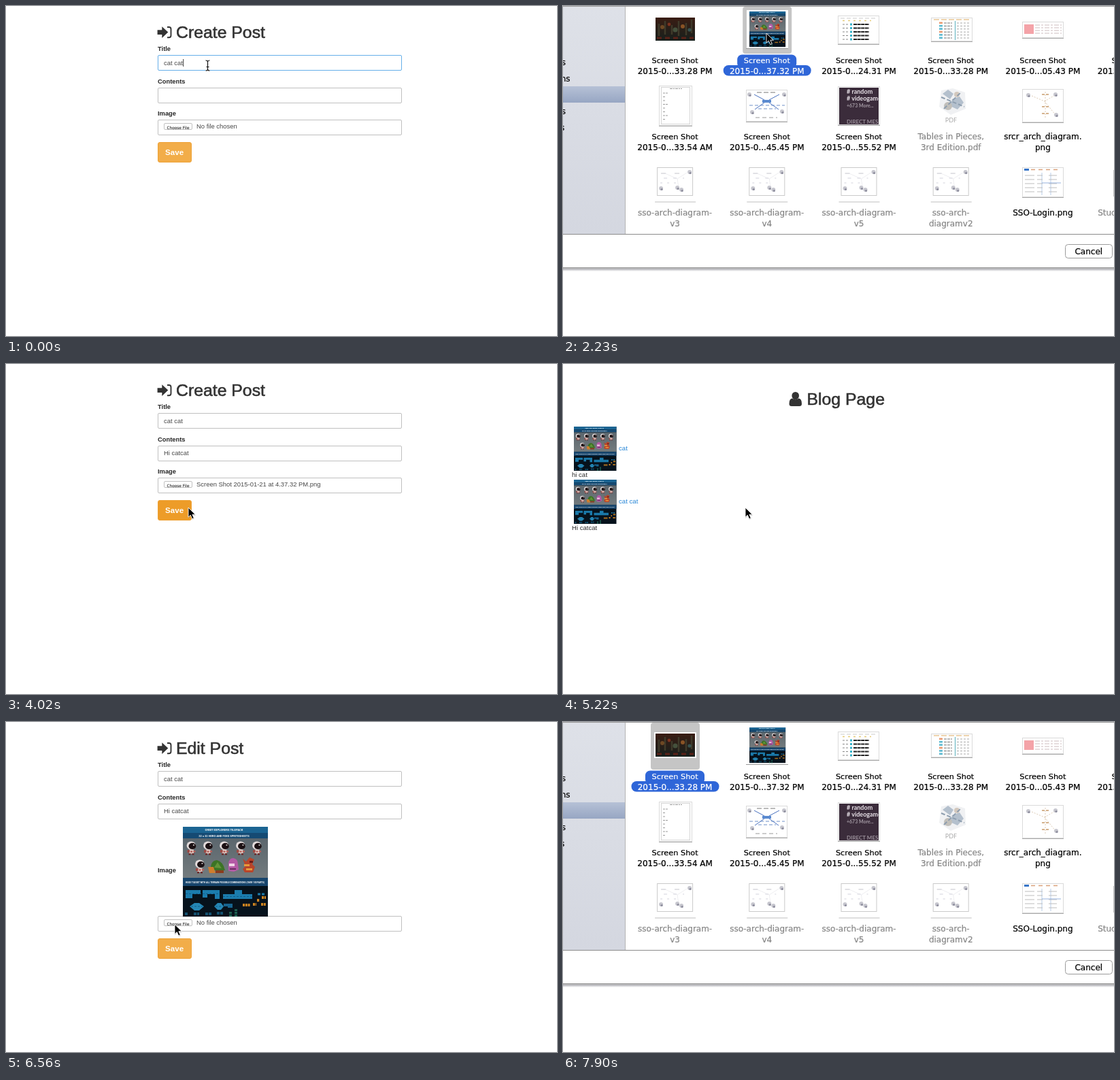
Recreate the animation shown at these times as an HTML page. Size 810x485 px, loop 8 s.

```html
<!DOCTYPE html>
<html lang="en">
<head>
<meta charset="utf-8">
<title>Create and edit a post</title>
<style>
html, body { margin: 0; width: 100%; height: 100%; overflow: hidden; background: #fff; }
svg { display: block; width: 810px; height: 485px; }
text { white-space: pre; }
.page { font-family: "Liberation Sans", Arial, sans-serif; font-size: 9.45px; fill: #484848; }
.page .label { font-weight: bold; font-size: 9.35px; fill: #262626; }
.page .head { font-size: 24.8px; fill: #333; stroke: #333; stroke-width: .6px; }
.page .save { font-weight: bold; font-size: 11.6px; fill: #fff; }
.page .dark { fill: #2b2b2b; font-size: 9.55px; }
.page .link { fill: #2585d6; font-size: 9.65px; }
.sys { font-family: "DejaVu Sans", sans-serif; font-size: 12px; fill: #000; }
.name, .place { stroke: currentColor; stroke-width: .22px; fill: currentColor; }
.tiny { font-family: "DejaVu Sans", sans-serif; font-size: 5.8px; fill: #000; }
.pack { font-family: Roboto, sans-serif; font-weight: bold; fill: #fff; text-anchor: middle; }
.chat { font-family: Lato, sans-serif; font-weight: bold; font-size: 9px; fill: #e8e2e8; }
</style>
</head>
<body>
<svg id="stage" viewBox="0 0 810 485" xmlns="http://www.w3.org/2000/svg"></svg>
<script>
const stage = document.getElementById('stage');
const range = n => [...Array(n).keys()];
const rect = (x, y, w, h, fill, extra = '') =>
  `<rect x="${x}" y="${y}" width="${w}" height="${h}" fill="${fill}" ${extra}/>`;
const text = (x, y, s, cls = '', extra = '') => `<text x="${x}" y="${y}" class="${cls}" ${extra}>${s}</text>`;
const shape = (d, fill) => `<path d="${d}" fill="${fill}"/>`;
const line = (d, color, width = 1, extra = '') =>
  `<path d="${d}" fill="none" stroke="${color}" stroke-width="${width}" ${extra}/>`;
const group = (id, body, extra = '') => `<g id="${id}" ${extra}>${body}</g>`;
const use = (id, x, y, sx = 1, sy = sx) => `<use href="#${id}" transform="translate(${x} ${y}) scale(${sx} ${sy})"/>`;
const gradient = (id, a, b) =>
  `<linearGradient id="${id}" x2="0" y2="1"><stop stop-color="${a}"/><stop offset="1" stop-color="${b}"/></linearGradient>`;
const mid = 'text-anchor="middle"';

// Sprite sheet picture, 125 x 132
const hero = `<ellipse cx="-.3" cy="-.3" rx="6.6" ry="6.2" fill="#e4dcdc"/><ellipse cx="1.4" cy=".4" rx="5.4" ry="4.6" fill="#1b1013"/>
  <ellipse cx="3.4" cy="-1.2" rx="1.1" ry=".9" fill="#e9e4e4"/>` +
  rect(-3.5, 5.5, 7, 6, '#dcc6c0') + rect(-6, 6, 3.5, 4, '#9c4a44') + rect(3, 7, 3, 2.5, '#b9605a') +
  rect(-1.5, 7.5, 3, 2, '#b0524b') + rect(-4, 11, 3, 2.4, '#6d2a2a') + rect(1, 11, 3, 2.4, '#6d2a2a');
const pack =
  rect(0, 0, 125, 132, '#06121c') + rect(0, 0, 125, 9, '#1b6492') + rect(0, 9, 125, 8, '#154a73') +
  rect(0, 17, 125, 58, 'url(#steel)') + rect(0, 75, 125, 12, '#17456c') +
  `<g class="pack">` +
  text(60.5, 6.3, 'ORBIT EXPLORERS TILEPACK', '', 'font-size="4.2"') +
  text(60.5, 14.5, '32 x 32 HERO AND FOES SPRITESHEETS', '', 'font-size="4.05"') +
  text(62, 82.6, 'HUGE TILESET WITH ALL TERRAIN POSSIBLE COMBINATIONS (OVER 100 PARTS)', '', 'font-size="3.15"') + '</g>' +
  [12.5, 37, 61, 85, 109].map(x => use('hero', x, 28)).join('') + use('hero', 25, 55) +
  shape('M41 64Q40 50 50 49Q59 51 62 64Z', '#3c7425') + shape('M46 60L51 52L57 61Z', '#63953a') +
  shape('M37 59h8l3 9H39z', '#cf7d2d') + shape('M48 64h12v4H48z', '#8a3c1e') +
  shape('M67 65V54Q68 46 74 46Q81 47 81 55L82 63L75 66Z', '#b45aa6') + shape('M68 54h8v4h-8z', '#f0d3e6') + shape('M69 61h9v2h-9z', '#6b2c63') +
  shape('M88 47l5 4 5-6 7 3-3 7 4 4-3 8H91l-3-5 4-4z', '#b8452a') + shape('M90 55h8v3h-8zM93 61h9v3h-9z', '#e79a3b') + shape('M98 50h5v3h-5z', '#6b1c18') +
  shape('M4 93H26V99H14V105H4ZM29 93H54V106H47V99H36V104H29ZM59 99H76V93H87V99H102V106H59Z', '#1b7cad') +
  shape('M10 117l7-5h7l7 5-7 6h-7zM46 117l5-5h5l4 5-4 5h-5z', '#2587b5') +
  line('M4 98.5H54M59 102.5H102M12 117H29M48 117H58', '#0f5c88', 1, 'stroke-dasharray="3 2"') +
  shape('M60 113H73V119H66V117H60Z', '#17648f') +
  line('M3 128H8M16 128H24M33 128H42M50 127H59', '#12506f', 4, 'stroke-dasharray="4 1"') +
  line('M78 121V132M70 125V132', '#1d5f50', 4, 'stroke-dasharray="3 1"') +
  line('M88 115H99M103 114H108M115 114H122M109 108H113M116 104H122', '#cf8420', 4, 'stroke-dasharray="3 .8"') +
  line('M110 99H122', '#1d7aa8', 3, 'stroke-dasharray="4 2"');

// Form and blog pages
const field = (id, y) => rect(223.5, y + .5, 358, 22, '#fff', `id="${id}" rx="1.5" stroke="#c0c0c0"`);
const signIn = shape('M222.6 35.3H229.3V30.2L238.3 38.6L229.3 47V42H222.6Z', '#333') +
  line('M237 31H239.6Q242.5 31 242.5 34V43.3Q242.5 46.3 239.6 46.3H237', '#333', 1.9);
const form = signIn + text(250, 47, '', 'head', 'id="heading"') +
  text(223, 66, 'Title', 'label') + field('titleBox', 72) + text(232, 87, 'cat cat') +
  text(223, 114, 'Contents', 'label') + field('bodyBox', 120) + text(232, 134, '', '', 'id="bodyText"') +
  text(223, 161, 'Image', 'label', 'id="imageLabel"') +
  group('lower', field('fileBox', 167) +
    rect(232.5, 172.5, 41, 9, '#fdfdfd', 'id="choose" rx="1.5" stroke="#c2c2c2"') +
    text(236.5, 180.7, 'Choose File', 'tiny') + text(280, 180, '', '', 'id="fileName"') +
    rect(223.5, 200.5, 49, 29, '#f0ad4e', 'id="save" rx="2.5" stroke="#eea236"') + text(234, 219, 'Save', 'save')) +
  group('preview', use('pack', 260, 154)) +
  rect(0, 0, .9, 11, '#222', 'id="caret"');
const blog =
  shape('M332.5 58.5Q332.5 51 337 50.5Q341.7 54 346.5 50.5Q351 51 351 58.5Q351 62 347.5 62H336Q332.5 62 332.5 58.5Z', '#333') +
  `<ellipse cx="341.7" cy="46.6" rx="5.3" ry="5.7" fill="#333"/>` +
  text(358.5, 60, 'Blog Page', 'head') +
  use('pack', 16, 92, .5, .492) + text(82, 127, 'cat', 'link') + text(13, 165.5, 'hi cat', 'dark') +
  use('pack', 16, 170, .5, .492) + text(82, 205, 'cat cat', 'link') + text(13, 243.5, 'Hi catcat', 'dark');

// File chooser
const colX = i => 164.6 + 135.2 * i;
const shot = tail => ['Screen Shot', '2015-0...' + tail];
const rows = [
  [shot('33.28 PM'), shot('37.32 PM'), shot('24.31 PM'), shot('33.28 PM'), shot('05.43 PM'), shot('11.09 PM')],
  [shot('33.54 AM'), shot('45.45 PM'), shot('55.52 PM'), ['Tables in Pieces,', '3rd Edition.pdf'], ['srcr_arch_diagram.', 'png']],
  [['sso-arch-diagram-', 'v3'], ['sso-arch-diagram-', 'v4'], ['sso-arch-diagram-', 'v5'], ['sso-arch-', 'diagramv2'], ['SSO-Login.png'], ['Studies-of-final-v2']]
];
const faded = (r, c) => r === 1 && c === 3 || r === 2 && c !== 4;
const label = (lines, r, c) => `<g id="name${r}${c}" class="name" ${mid} color="${faded(r, c) ? '#868686' : '#000'}">` +
  lines.map((s, k) => text(colX(c), 84 + 112 * r + 16 * k, s, '', s === 'Screen Shot' ? 'font-size="11.3"' : '')).join('') + '</g>';
const paper = (x, y, w, h) => rect(x + .5, y + .5, w - 1, h - 1, '#fff', 'stroke="#dadada"') +
  line(`M${x} ${y + h + .5}H${x + w}`, '#a9a9a9');
const dashes = (x, y, w, color, dash = '4 1 2 1', width = 1) =>
  line(`M${x} ${y}h${w}`, color, width, `stroke-dasharray="${dash}"`);
const faces = pts => pts.map(([x, y]) =>
  `<circle cx="${x}" cy="${y}" r="3" fill="#c6c6ce"/><circle cx="${x + 1}" cy="${y + 1.5}" r="1.6" fill="#8e8e9e"/>`).join('');
const glow = (x, y, r, color) => `<circle cx="${x}" cy="${y}" r="${r}" fill="${color}" opacity=".7"/>`;
const sketch = c => {
  const x = colX(c) - 26.5;
  return rect(x + .5, 237.5, 52, 41, '#fff', 'stroke="#cacaca"') + line(`M${x - 3} 288H${x + 57}`, '#d4d4d4', 1.6) +
    dashes(x + 6, 246, 36, '#c3c3cb', '7 13') + dashes(x + 10, 253, 30, '#d2d2dc', '5 9') + dashes(x + 5, 260, 24, '#d2d2dc', '3 7') +
    line(`M${x + 12} 246l18 8l14 -9M${x + 30} 254l2 15`, '#e2e2e8', .6) + faces([[x + 48, 244], [x + 6, 268], [x + 30, 267], [x + 36, 270]]);
};
const gameShot = rect(134, 15, 62, 38, '#fff') + rect(136, 17, 58, 34, 'url(#dusk)') +
  line('M141 44V26M150 42V22M160 42V28M170 44V22M181 43V25M189 40V20', '#3f3a2a', 2.5) +
  glow(146, 31, 3, '#8a5a2a') + glow(156, 27, 2.4, '#9c3a22') + glow(165, 35, 3.5, '#51664c') + glow(176, 30, 3, '#b06a2c') + glow(186, 35, 2.6, '#3f6a68') +
  dashes(138, 47, 54, '#5a2117', '7 5', 3);
const lists =
  paper(404, 14, 61, 42) + dashes(408, 18, 54, '#c9c9c9', '6 3') + dashes(411, 21.5, 42, '#e5cb78', '3 5', 1.4) +
  range(5).map(i => dashes(411, 27 + 5.5 * i, 8, '#888', '3 2') + rect(422, 25.5 + 5.5 * i, 3, 3, '#35b4cc') + dashes(427, 27 + 5.5 * i, 23, '#222', '5 .6', 1.8)).join('') +
  paper(541, 17, 61, 35) + dashes(545, 20, 52, '#e7c592', '8 3', 1.5) +
  range(6).map(i => rect(553, 23.5 + 4.4 * i, 5, 2.6, i % 3 ? '#5cb9d0' : '#e99a70') + dashes(560, 25 + 4.4 * i, 12, '#777', '4 1') + dashes(579, 25 + 4.4 * i, 18, '#aaa', '3 2')).join('') +
  line('M576.5 22V50', '#58aebb', 1) +
  paper(675, 23, 61, 24) + rect(678, 27, 14, 14, '#f4a3a8') + range(4).map(i => dashes(694, 28 + 4 * i, 39, '#cdbcbe', '7 2 3 2')).join('');
const diagrams =
  paper(141, 117, 49, 59) + rect(144.5, 119.5, 42, 54, '#fff', 'stroke="#d4d4d4"') + dashes(157, 121.5, 18, '#999') +
  range(8).map(i => dashes(147, 128 + 5.5 * i, i % 3 ? 4 : 8, '#999', '3 1')).join('') +
  paper(269, 123, 61, 47) + line('M296 138L281 130M303 138L318 130M296 142L282 152M303 142L317 152', '#4a72c0', 1) + rect(293, 138, 13, 4, '#5a8ad0') +
  dashes(285, 127, 30, '#777', '7 3') + dashes(274, 146, 52, '#6f90c8', '5 3') + dashes(287, 151, 26, '#6f90c8', '5 3') + dashes(283, 164, 32, '#999', '6 4') +
  faces([[274, 130], [325, 130], [278, 156], [322, 155]]) +
  paper(675, 122, 61, 49) + line('M709 126V166M689 132L708 140L725 130M708 140L724 160', '#cdb494', .7, 'stroke-dasharray="2 2"') +
  faces([[684, 131], [724, 130], [725, 160]]) + [130, 148, 158].map(y => dashes(704, y, 11, '#c79a6a', '4 2', 1.6)).join('') +
  range(4).map(sketch).join('') + rect(809, 241, 1, 39, '#c4c4c4') +
  paper(675, 237, 61, 44) + rect(678, 239, 7, 3, '#3976c8') + dashes(688, 240.5, 42, '#d9a07a', '6 5', 1.5) +
  line('M704 245V278M717 245V278', '#a5bfe2', .8) + range(5).map(i => dashes(679, 249 + 6 * i, 47, '#bdbdbd', '14 4 8 9')).join('') + line('M704 260H732', '#7ba0d6', .8);
const chat = paper(404, 118, 62, 57) + rect(406, 120, 58, 54, '#3b2c3b') +
  `<svg x="406" y="120" width="58" height="54" viewBox="406 120 58 54" class="chat">` +
  text(417, 129, '# random') + text(417, 139, '# videogames') + text(417, 149, '+673 More...', '', 'font-size="7" opacity=".6"') +
  text(417, 173, 'DIRECT MESSAGE', '', 'font-size="8" opacity=".55"') + '</svg>';
const book = shape('M556 124l17 -3 18 6 1 24 -22 9 -17 -12z', '#f0f1f3') +
  shape('M558 129l8 -6 8 6 -5 8zM572 137l11 -4 6 9 -9 10 -11 -5z', '#b4c0cd') +
  `<circle cx="566" cy="147" r="6" fill="#c1bfba"/><circle cx="579" cy="130" r="4" fill="#d3c8bd"/>` +
  line('M556 134L590 148M560 151L586 126', '#8e9eaf', 2, 'stroke-dasharray="6 3"') +
  text(570.5, 171, 'PDF', '', `${mid} font-size="9" style="fill:#aaa"`);
const thumbs = gameShot + rect(270, 6, 61, 56, '#fff') + use('pack', 274, 8, .425, .395) + line('M269 62.5H331', '#999') +
  lists + diagrams + chat + book;
const selection = group('selection', rect(129, 1, 72, 69, '#c5c5c5', 'rx="4"') +
  rect(121, 71.5, 87, 20, '#2f66d8', 'rx="7"') + rect(100.5, 87, 129, 15.5, '#2f66d8', 'rx="7.5"'));
const sheet =
  rect(0, -10, 810, 395, '#fff') + rect(0, 386, 810, 4, 'url(#shade)') +
  group('sidebar', rect(0, 0, 91, 335, 'url(#side)') + rect(0, 118, 91, 24, 'url(#row)')) +
  [['Downloads', 4, 86.5], ['Applications', 10.5, 110.5], ['Documents', 4, 158.5], ['Pictures', 2.3, 182.5]]
    .map(([s, x, y]) => text(x, y, s, 'place', 'text-anchor="end"')).join('') +
  line('M91.5 -6V335', '#b4b4b4') + line('M0 .5H810', '#9a9a9a') + line('M0 335.5H810', '#8b8b8b') + line('M0 384.8H810', '#777', 1.2) +
  rect(738.5, 350.5, 69, 20, '#fff', 'rx="4" stroke="#9b9b9b"') + text(772.8, 364.8, 'Cancel', 'place', mid) +
  group('files', selection + thumbs + rows.map((row, r) => row.map((n, c) => label(n, r, c)).join('')).join(''));

const beam = 'M-3 -7.5Q0 -7.5 0 -5.5Q0 -7.5 3 -7.5M0 -6V6M-3 7.5Q0 7.5 0 5.5Q0 7.5 3 7.5M-2 2H2';
stage.innerHTML = '<defs>' +
  gradient('steel', '#5b666d', '#737b7e') + gradient('dusk', '#3a1d13', '#17201d') + gradient('side', '#dee1e8', '#d4d7e0') +
  gradient('row', '#b6c1d6', '#97a6c3') + gradient('shade', '#aaaab0', '#fff') + gradient('press', '#8bb9ee', '#4c92e2') +
  group('hero', hero) + group('pack', pack) + '</defs>' +
  group('form', form, 'class="page"') + group('blog', blog, 'class="page"') + group('sheet', sheet, 'class="sys"') +
  group('ghost', rect(224, 331, 48, 16, '#ede5da', 'rx="2"') + shape('M234 331h28v5l-4 2h-8l-4-1-4 1h-7z', '#fff')) +
  group('ibeam', line(beam, '#fff', 2.6) + line(beam, '#111', 1.2)) +
  group('arrow', `<path d="M0 1.5V16L3.4 12.8L5.8 18L8.8 16.8L6.5 12H11Z" fill="#000" opacity=".16"/>
    <path d="M0 0V14.2L3.3 11.1L5.7 16.6L8.3 15.5L5.9 10.2H10.4Z" fill="#000" stroke="#fff" stroke-width=".9"/>`);

const el = {};
stage.querySelectorAll('[id]').forEach(node => el[node.id] = node);
const show = (id, on) => el[id].style.display = on ? '' : 'none';
const set = (id, name, value) => el[id].setAttribute(name, value);

// Each step overrides the state before it; sheet is the vertical offset, null when closed.
const steps = [
  [0, { page: 'Create Post', focus: 'title', body: '', file: 'No file chosen', ibeam: [296.5, 87.5], arrow: null,
        pressed: false, hover: false, sheet: null, ready: false, files: false, selected: 0 }],
  [450, { focus: 'body', ibeam: null }],
  [600, { body: 'Hi ca' }],
  [750, { body: 'Hi catcat' }],
  [1190, { ibeam: [296.5, 87.5] }],
  [1340, { ibeam: null, arrow: [274, 202] }],
  [1480, { focus: '', arrow: [265, 174], pressed: true }],
  [1780, { sheet: -6 }],
  [1930, { sheet: 0, ready: true, files: true, arrow: null }],
  [2230, { selected: 1, arrow: [299, 40] }],
  [2380, { arrow: [781, 347] }],
  [3120, { sheet: null, ready: false, files: false, pressed: false, arrow: null, file: 'Screen Shot 2015-01-21 at 4.37.32 PM.png' }],
  [3570, { arrow: [584, 360] }],
  [3720, { arrow: [420, 290] }],
  [3870, { arrow: [268, 211], hover: true }],
  [4170, { page: 'Blog', hover: false }],
  [5370, { arrow: [170, 208] }],
  [5520, { arrow: [98, 202] }],
  [5660, { page: 'Edit Post', file: 'No file chosen' }],
  [5810, { arrow: [290, 250] }],
  [6560, { arrow: [248, 297.5] }],
  [6850, { pressed: true }],
  [7000, { arrow: [248, 295.5] }],
  [7300, { sheet: -150, selected: 0 }],
  [7450, { sheet: -6, ghost: true }],
  [7600, { sheet: 0, ready: true, ghost: false }],
  [7900, { files: true, arrow: null }]
];
let last = {};
const timeline = steps.map(([at, change]) => ({ at, state: last = { ...last, ...change } }));

function place(id, point) {
  show(id, point);
  if (point) set(id, 'transform', `translate(${point})`);
}

function draw(s) {
  const edit = s.page === 'Edit Post', blogPage = s.page === 'Blog', open = s.sheet !== null;
  show('form', !blogPage);
  show('blog', blogPage);
  el.heading.textContent = s.page;
  el.bodyText.textContent = s.body;
  el.fileName.textContent = s.file;
  set('imageLabel', 'y', edit ? 221 : 161);
  set('lower', 'transform', `translate(0 ${edit ? 118 : 0})`);
  show('preview', edit);
  set('titleBox', 'stroke', s.focus === 'title' ? '#66afe9' : '#c0c0c0');
  set('bodyBox', 'stroke', s.focus === 'body' ? '#66afe9' : '#c0c0c0');
  set('choose', 'fill', s.pressed ? 'url(#press)' : '#fdfdfd');
  set('choose', 'stroke', s.pressed ? '#6d9fd8' : '#c2c2c2');
  set('save', 'fill', s.hover ? '#ed9c28' : '#f2ad49');
  show('caret', s.focus);
  set('caret', 'x', s.focus === 'title' ? 260.3 : 232.3 + (s.body ? el.bodyText.getComputedTextLength() : 0));
  set('caret', 'y', s.focus === 'title' ? 78 : 125.5);

  show('sheet', open);
  if (open) set('sheet', 'transform', `translate(0 ${s.sheet})`);
  show('sidebar', s.ready);
  show('files', s.files);
  set('selection', 'transform', `translate(${135.2 * s.selected} 0)`);
  [0, 1].forEach(c => set('name0' + c, 'color', c === s.selected ? '#fff' : '#000'));
  show('ghost', s.ghost);
  place('ibeam', s.ibeam);
  place('arrow', s.arrow);
}

let shown;
function frame() {
  const t = performance.now() % 8000;
  const { state } = timeline.findLast(step => step.at <= t);
  if (state !== shown) draw(shown = state);
  requestAnimationFrame(frame);
}
frame();
</script>
</body>
</html>
```
